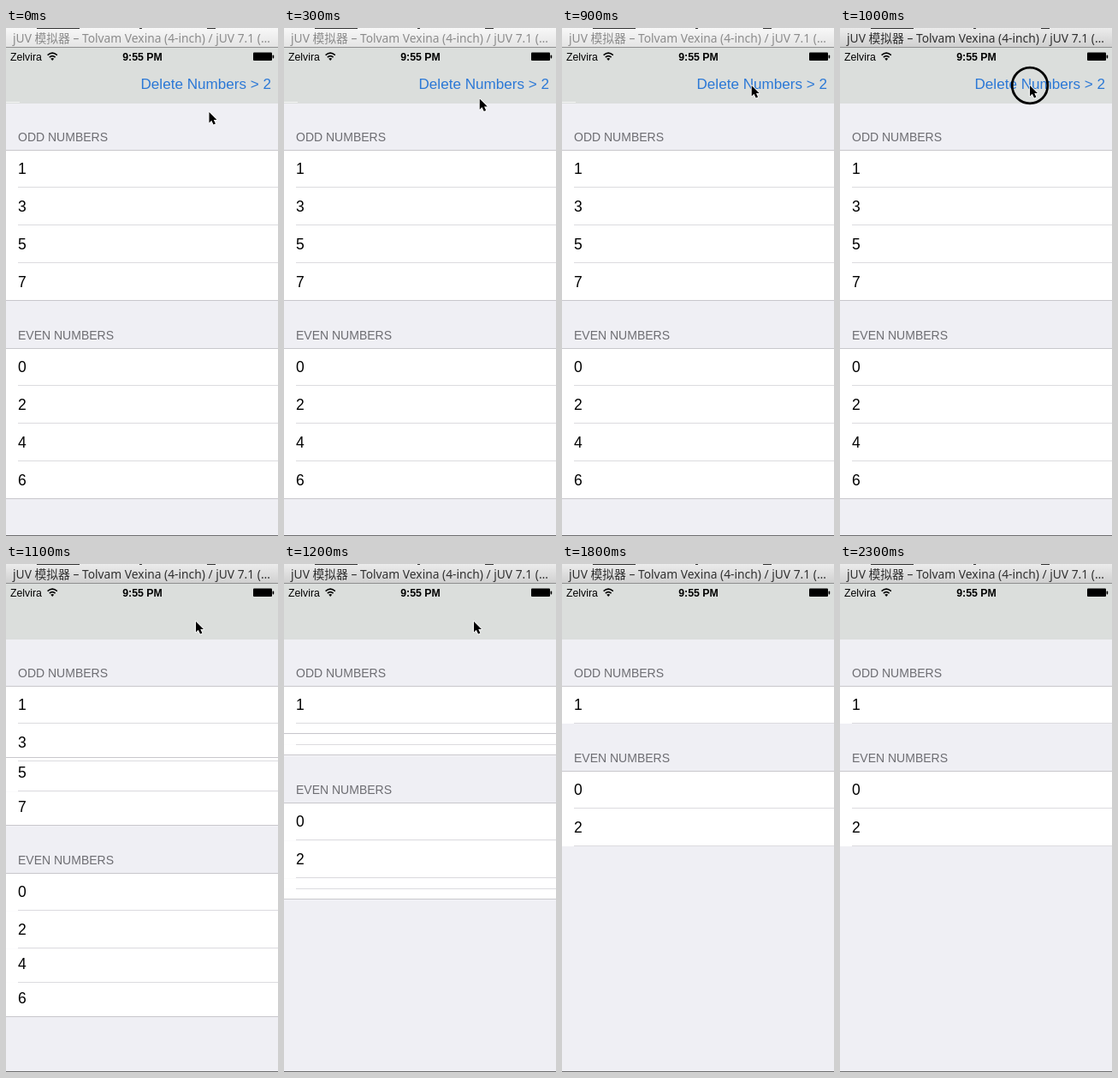
These frames come from a looping animation (318x592 px, 2400 ms). An HTML page:

```html
<!DOCTYPE html>
<html lang="en">
<head>
<meta charset="utf-8">
<title>Number list</title>
<style>
  html, body { margin: 0; width: 318px; height: 592px; overflow: hidden; background: #efeff4; }
  svg { display: block; }
  text { font-family: "Liberation Sans", Arial, sans-serif; white-space: pre; }
  .title { font: 13.8px "Noto Sans", "Noto Sans CJK SC", "Noto Sans CJK", sans-serif; }
  .status { font-size: 12.3px; }
  .head { font-size: 14px; fill: #6d6d72; }
  .num { font-size: 17.5px; }
  .action { font-size: 17.1px; fill: #2b78d6; text-anchor: end; }
</style>
</head>
<body>
<svg id="stage" width="318" height="592" viewBox="0 0 318 592">
  <defs>
    <linearGradient id="idle" x2="0" y2="1">
      <stop stop-color="#f8f8f8"/><stop offset="1" stop-color="#e4e4e4"/>
    </linearGradient>
    <linearGradient id="active" x2="0" y2="1">
      <stop stop-color="#ececec"/><stop offset="1" stop-color="#d0d0d0"/>
    </linearGradient>
  </defs>
  <rect width="318" height="592" fill="#efeff4"/>
  <g id="list"></g>
  <rect y="23" width="318" height="65" fill="#dbdedc"/>
  <rect id="hint" y="86" width="16" height="1" fill="#f4f5f4"/>
  <text class="status" x="5" y="38">Zelvira</text>
  <text class="status" x="159.5" y="38" text-anchor="middle" font-weight="bold">9:55 PM</text>
  <g fill="none" stroke="#000" stroke-width="1.6">
    <path d="M48.6 31.6Q54.2 26.8 59.8 31.6M50.8 34.2Q54.2 31.2 57.6 34.2"/>
    <path d="M54.2 38L52.2 35.8Q54.2 34.4 56.2 35.8Z" fill="#000" stroke="none"/>
  </g>
  <rect x="289" y="28.5" width="22" height="9.5" rx="1"/>
  <rect x="311.6" y="31.5" width="1.6" height="4" rx=".8"/>
  <text id="action" class="action" x="310" y="71">Delete Numbers &gt; 2</text>
  <rect id="bar" width="318" height="22"/>
  <path d="M36 .5h50M156 .5h3M235 .5h10" stroke="#333"/>
  <rect y="22" width="318" height="1" fill="#8f8f8f"/>
  <text id="title" class="title" x="8" y="17.3">jUV 模拟器 – Tolvam Vexina (4-inch) / jUV 7.1 (…</text>
  <rect y="591" width="318" height="1" fill="#6e6e70"/>
  <circle id="ring" cx="222" cy="67" r="20.8" fill="none" stroke="#000" stroke-width="2.8"/>
  <path id="cursor" d="M0 0V12.4L2.8 9.8L5 14.6L7.4 13.6L5.3 9H9Z"
        stroke="#fff" stroke-width="1.6" stroke-linejoin="round" paint-order="stroke"/>
</svg>
<script>
const LOOP = 2400, STEP = 100, ROW = 44;
const PRESS = 10, FADE = 11, GONE = 18;
const EDGE = '#c8c7cc', INSET = '#dcdbdf';

// step, x, y of the pointer tip
const PATH = [[0, 237.5, 98], [6, 220, 67], [10, 222, 67], [12, 222, 67],
              [13, 223, 67], [14, 228, 62], [15, 250, 46], [16, 282, 24], [17, 306, 4]];
const COLLAPSE = { 11: .097, 12: .717 };

const $ = id => document.getElementById(id);
const show = (id, on) => $(id).setAttribute('visibility', on ? 'visible' : 'hidden');
const line = (x, y) =>
  `<rect x="${x}" y="${Math.round(y)}" width="${318 - x}" height="1" fill="${x ? INSET : EDGE}"/>`;

function pointer(step) {
  const i = Math.max(1, PATH.findIndex(k => k[0] >= step));
  const [a, x0, y0] = PATH[i - 1], [b, x1, y1] = PATH[i];
  const t = (step - a) / (b - a), e = t * t * (3 - 2 * t);
  return [x0 + (x1 - x0) * e, y0 + (y1 - y0) * e];
}

// Rows past "keep" shrink by p; their content slides up unless pinned.
function section(name, top, nums, keep, p, pinned) {
  let out = `<text class="head" x="14" y="${top - 10}">${name}</text>`;
  let y = top, rows = '', lines = line(0, top);
  nums.forEach((n, i) => {
    const h = i < keep ? ROW : ROW * (1 - p);
    if (!h) return;
    const shift = n === pinned ? 0 : h - ROW;
    rows += `<rect y="${y}" width="318" height="${h}" fill="#fff"/>` +
      `<svg y="${y}" width="318" height="${h}"><text class="num" x="14" y="${28 + shift}">${n}</text></svg>`;
    y += h;
    const last = i === nums.length - 1;
    lines += line(last ? 0 : 14, y - 1);
    if (n === pinned && p > 0) {
      lines += line(0, y - 1);
      if (p < .5) lines += line(14, top + ROW * (i + 1) - 1);
    }
  });
  return { markup: out + rows + lines, bottom: y };
}

function draw(step) {
  const p = step < FADE ? 0 : COLLAPSE[step] ?? 1;
  const odd = section('ODD NUMBERS', 142, [1, 3, 5, 7], 1, p, 3);
  const even = section('EVEN NUMBERS', odd.bottom + 55, [0, 2, 4, 6], 2, p);
  $('list').innerHTML = odd.markup + even.markup;

  const active = step >= PRESS;
  $('bar').setAttribute('fill', active ? 'url(#active)' : 'url(#idle)');
  $('title').setAttribute('fill', active ? '#303030' : '#8c8c8c');
  show('hint', !active);
  show('action', step < FADE);
  show('ring', step === PRESS);
  show('cursor', step < GONE);
  if (step < GONE) $('cursor').setAttribute('transform', `translate(${pointer(step)})`);
}

const start = performance.now();
let shown = -1;
function tick() {
  const step = Math.floor((performance.now() - start) % LOOP / STEP);
  if (step !== shown) draw(shown = step);
  requestAnimationFrame(tick);
}
tick();
</script>
</body>
</html>
```
